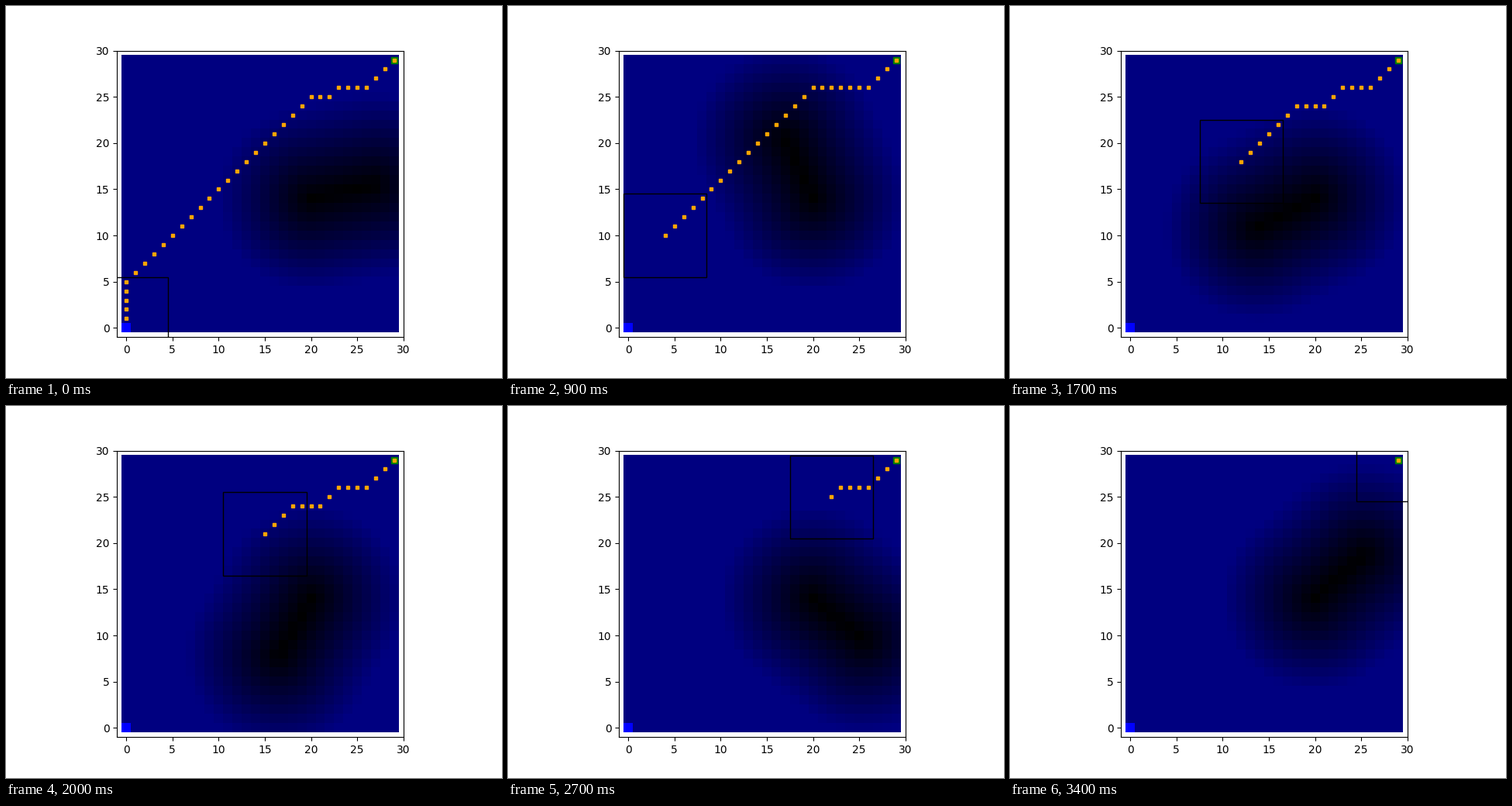
A matplotlib script for the animation above (3.5 s loop, 640 by 480 pixels).

```python
import numpy as np
import matplotlib.pyplot as plt
from matplotlib.animation import FuncAnimation
from matplotlib.patches import Rectangle

SIZE, FRAMES, INTERVAL = 30, 35, 100
PIVOT, ARM, REACH = np.array([20, 14]), 7, 10
SENSOR = 9
GOAL = (29, 29)


def walk(*points):
    """Grid cells visited by king moves through the waypoints."""
    cells = [points[0]]
    for target in points[1:]:
        while cells[-1] != target:
            x, y = cells[-1]
            cells.append((x + int(np.sign(target[0] - x)),
                          y + int(np.sign(target[1] - y))))
    return np.array(cells)


# Each replanned route holds from its first step until the next one starts.
HEAD = [(0, 1), (0, 5)]
DETOUR = HEAD + [(4, 9), (4, 10)]
ROUTES = [
    (0, walk(*HEAD, (20, 25), (22, 25), (23, 26), (26, 26), GOAL)),
    (3, walk(*HEAD, (24, 29), GOAL)),
    (9, walk(*DETOUR, (20, 26), (26, 26), GOAL)),
    (15, walk(*DETOUR, (18, 24), (21, 24), (23, 26), (26, 26), GOAL)),
]


def route_at(step):
    return [cells for start, cells in ROUTES if start <= step][-1][step:]


def field(step):
    """Shade of every cell by its distance to the rotating arm."""
    angle = 0.2 * (step + 1)
    arm = ARM * np.array([np.cos(angle), np.sin(angle)])
    y, x = np.mgrid[:SIZE, :SIZE]
    rel = np.stack([x, y], axis=-1) - PIVOT
    along = np.clip(rel @ arm / (arm @ arm), 0, 1)
    dist = np.linalg.norm(rel - along[..., None] * arm, axis=-1)
    rgb = np.zeros((SIZE, SIZE, 3))
    rgb[..., 2] = 128 / 255 * np.clip(dist / REACH, 0, 1)
    rgb[0, 0] = 0, 0, 1
    return rgb


fig, ax = plt.subplots(figsize=(6.4, 4.8), dpi=100)
image = ax.imshow(field(0), origin="lower", interpolation="nearest")
ax.set(xlim=(-1, SIZE), ylim=(-1, SIZE))
ticks = range(0, SIZE + 1, 5)
ax.set_xticks(ticks)
ax.set_yticks(ticks)

window = ax.add_patch(Rectangle((0, 0), SENSOR, SENSOR, fill=False,
                                edgecolor="black", linewidth=1))
ax.plot(*GOAL, "s", color="green")
trail, = ax.plot([], [], "s", color="orange", markersize=3)


def update(step):
    cells = route_at(step)
    image.set_data(field(step))
    window.set_xy(cells[0] - SENSOR / 2)
    trail.set_data(cells[:, 0], cells[:, 1])
    return image, window, trail


anim = FuncAnimation(fig, update, frames=FRAMES, interval=INTERVAL,
                     repeat=True, repeat_delay=0)
plt.show()
```
